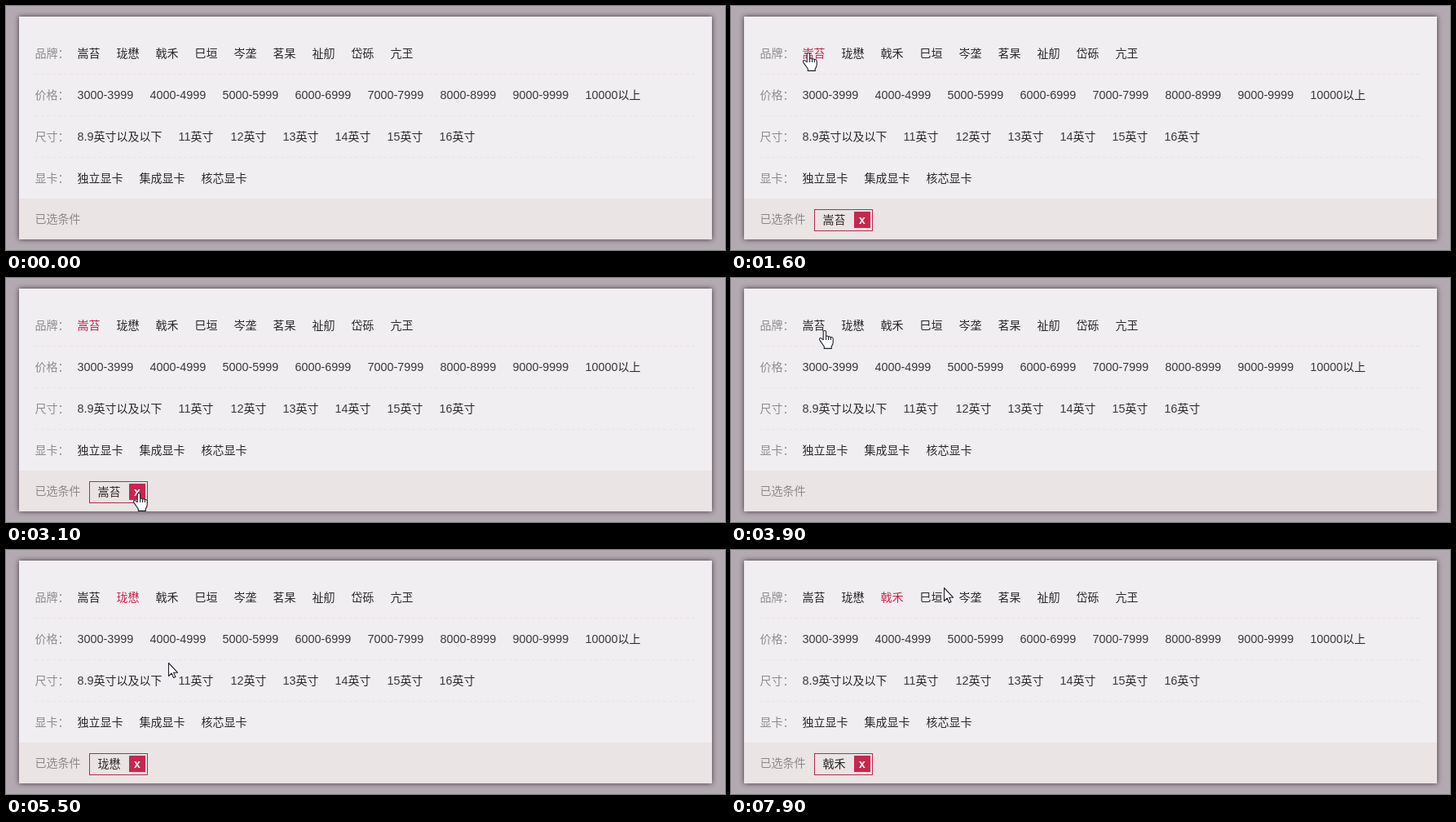
Write an HTML page that moves like this. It is 882 px wide and 299 px high and loops after 8 s.

```html
<!DOCTYPE html>
<html lang="zh-CN">
<head>
<meta charset="utf-8">
<title>商品筛选</title>
<style>
  html, body { margin: 0; width: 100%; height: 100%; overflow: hidden; background: #b3a9b0; }
  svg { display: block; }
  .panel { filter: drop-shadow(0 0 3px rgba(40, 20, 35, .8)); }
  text { font: 14px "Noto Sans CJK SC", "Noto Sans CJK", sans-serif; fill: #292929; white-space: pre; }
  .latin { font: 14.4px "Liberation Sans", Arial, sans-serif; fill: #3a3a3a; }
  .label { fill: #8e8a8c; }
  .on, .on .latin { fill: #c8264f; }
  .close { font: bold 14px "Liberation Sans", Arial, sans-serif; fill: #fff; text-anchor: middle; }
  .rule { stroke: #f4dde3; stroke-dasharray: 4 3; }
  #cursor path { fill: #fff; stroke: #20202c; stroke-width: 1.1; stroke-linejoin: round; }
  #cursor .beam { fill: none; stroke-width: 1; }
</style>
</head>
<body>
<svg width="882" height="299" viewBox="0 0 882 299">
  <g class="panel"><rect x="16" y="13" width="850" height="273" fill="#f0eef1"/></g>
  <rect x="16" y="236" width="850" height="50" fill="#eae4e4"/>
  <g id="rows"></g>
  <text class="label" x="35.5" y="266">已选条件</text>
  <g id="chip">
    <rect x="102.5" y="249.5" width="71" height="26" fill="none" stroke="#b92a50"/>
    <text id="chipText" x="112.5" y="267"></text>
    <rect x="151" y="252" width="20" height="20" fill="#c8264f"/>
    <text class="close" x="161" y="267">x</text>
  </g>
  <g id="cursor">
    <path class="arrow" d="M.5 .5V16.5L4.2 13L6.6 18.6L9 17.6L6.6 12.2H11.5Z"/>
    <path class="hand" transform="translate(-1)" d="M-.8 12V2.2a1.7 1.7 0 0 1 3.4 0V7.5q1.6-1.2 3 .5q1.6-.8 2.8 .6q2.8-.5 2.8 2V15q0 2.6-1.9 4.6V22.4H.3V20L-4.9 12.6q-1.4-2.6 .6-3.1q1.2-.1 3.5 2.5M2.6 7.5V12M5.6 8V12M8.4 8.6V12"/>
    <path class="beam" d="M-3 -7.5H-1L0 -6.5L1 -7.5H3M0 -6.5V6.5M-3 7.5H-1L0 6.5L1 7.5H3"/>
  </g>
</svg>
<script>
const LOOP = 8000, STEP = 100;
const $ = id => document.getElementById(id);
const range = (from, to, make) => Array.from({ length: to - from + 1 }, (_, i) => make(from + i));

const rows = [
  ['品牌：', '嵩苔 珑懋 戟禾 巳垣 岑垄 茗杲 祉舠 岱砾 亢玊'.split(' ')],
  ['价格：', [...range(3, 9, k => `${k}000-${k}999`), '10000以上']],
  ['尺寸：', ['8.9英寸以及以下', ...range(11, 16, n => n + '英寸')]],
  ['显卡：', ['独立显卡', '集成显卡', '核芯显卡']]
];

function add(parent, tag, attrs, content = '') {
  const el = document.createElementNS('http://www.w3.org/2000/svg', tag);
  for (const key in attrs) el.setAttribute(key, attrs[key]);
  el.innerHTML = content;
  return parent.appendChild(el);
}

const advance = c => /\d/.test(c) ? 8 : c === '-' ? 5 : c === '.' ? 4 : 14;
const widthOf = s => [...s].reduce((sum, c) => sum + advance(c), 0);
const links = [];

rows.forEach(([label, items], i) => {
  const mid = 58 + 51 * i;
  add($('rows'), 'text', { class: 'label', x: 35.5, y: mid + 5 }, label);
  let x = 88;
  for (const name of items) {
    const html = name.replace(/[\d.-]+/g, '<tspan class="latin">$&</tspan>');
    const el = add($('rows'), 'text', { x: x - 0.5, y: mid + 5 }, html);
    const w = widthOf(name);
    links.push({ el, name, x, w, mid });
    x += w + 20;
  }
  if (i < rows.length - 1) {
    const y = mid + 25.5;
    add($('rows'), 'line', { class: 'rule', x1: 36, x2: 846, y1: y, y2: y });
  }
});

// The pointer travels between places; a click selects a brand (or clears with -1).
const onBrand = (i, dx, dy) => ({ x: links[i].x + dx, y: links[i].mid + dy });
const onChip = (dx, dy) => ({ x: 102 + dx, y: 262 + dy });
const moves = [
  { at: 100, x: 866, y: 0 },
  { at: 700, ...onBrand(0, -14, -3) },
  { at: 900, ...onBrand(1, 36, -8) },
  { at: 1300, ...onBrand(0, 7, -1), click: 1600, pick: 0 },
  { at: 2500, ...onChip(38, -1) },
  { at: 3100, ...onChip(61, 1), click: 3300, pick: -1 },
  { at: 3900, ...onBrand(0, 27, 6) },
  { at: 4200, ...onBrand(1, 14, 1), click: 4500, pick: 1 },
  { at: 5100, ...onChip(40, 14) },
  { at: 5500, x: 199, y: 138 },
  { at: 6200, ...onBrand(2, 13, -5), click: 6600, pick: 2 },
  { at: 6800, ...onBrand(2, 5, 25) },
  { at: 7200, ...onChip(14, 0) },
  { at: 7800, ...onBrand(4, 12, -22) },
  { at: 7900, ...onBrand(3, 29, -12) }
];
const ease = k => (1 - Math.cos(Math.PI * k)) / 2;

function pointerAt(t) {
  const i = moves.findLastIndex(m => m.at <= t);
  const from = moves[i], to = moves[i + 1] || from;
  const leave = from.click ? from.click + STEP : from.at;
  const k = to === from ? 0 : ease(Math.max(0, (t - leave) / (to.at - leave)));
  return ['x', 'y'].map(axis => Math.round(from[axis] + (to[axis] - from[axis]) * k));
}

function shapeAt(x, y, hasChip) {
  if (hasChip && x >= 102 && x < 174 && y >= 250 && y <= 275) return x < 151 ? 'beam' : 'hand';
  const over = links.some(l => x >= l.x && x <= l.x + l.w && Math.abs(y - l.mid) <= 10);
  return over ? 'hand' : 'arrow';
}

function draw() {
  const t = Math.floor(performance.now() % LOOP / STEP) * STEP;
  const picked = moves.findLast(m => m.click <= t)?.pick ?? -1;
  const hasChip = picked >= 0;
  links.forEach((l, i) => l.el.classList.toggle('on', i === picked));
  $('chip').style.display = hasChip ? '' : 'none';
  $('chipText').textContent = hasChip ? links[picked].name : '';

  const visible = t >= moves[0].at;
  $('cursor').style.display = visible ? '' : 'none';
  if (visible) {
    const [x, y] = pointerAt(t);
    const shape = shapeAt(x, y, hasChip);
    $('cursor').setAttribute('transform', `translate(${x} ${y})`);
    for (const el of $('cursor').children)
      el.style.display = el.classList.contains(shape) ? '' : 'none';
  }
  requestAnimationFrame(draw);
}
draw();
</script>
</body>
</html>
```
